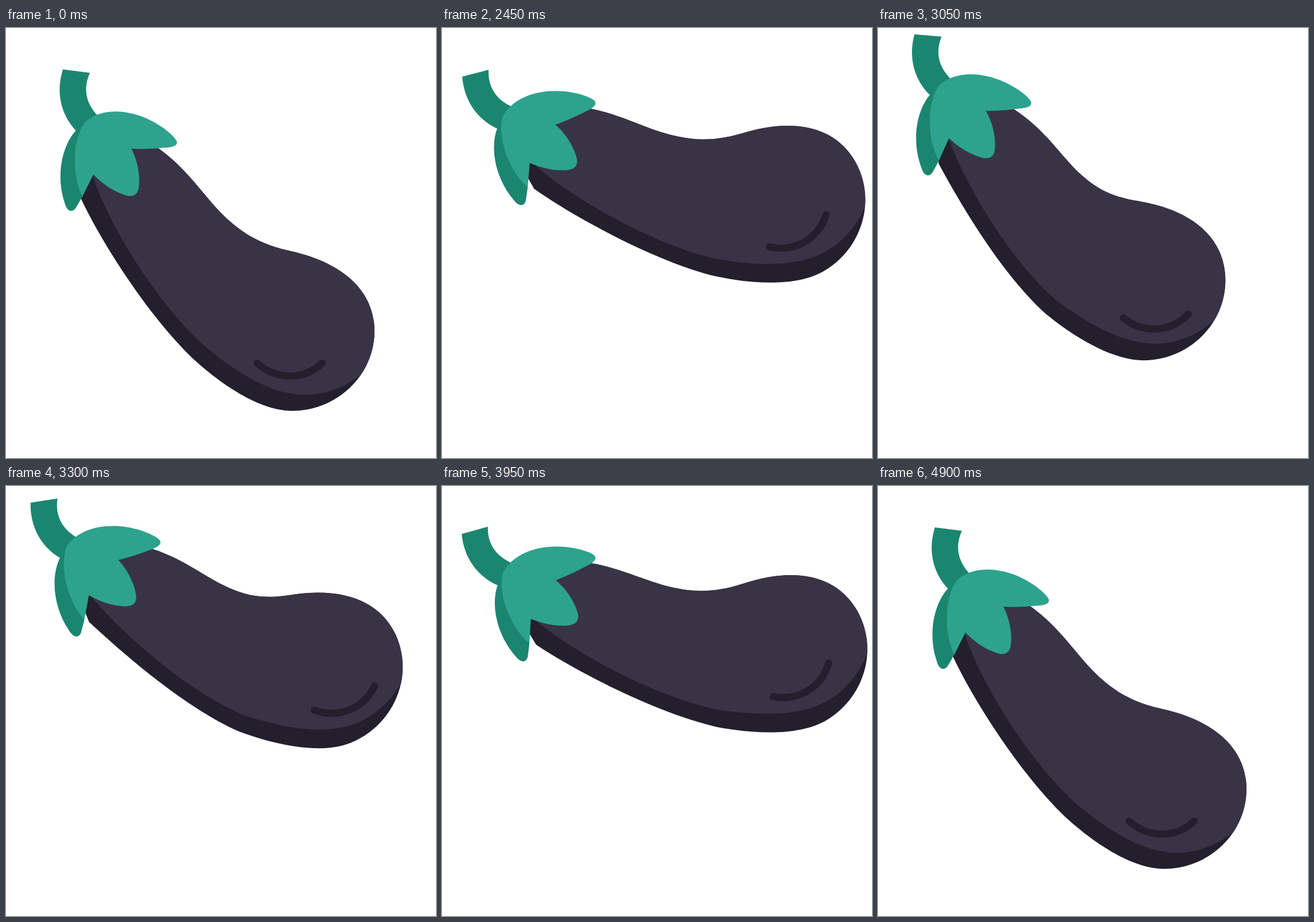
Write an HTML page that moves like this. It is 748 px wide and 748 px high and loops after 4.92 s.

```html
<!DOCTYPE html>
<html lang="en">
<head>
<meta charset="utf-8">
<title>Swinging eggplant</title>
<style>
  html, body { margin: 0; width: 100%; height: 100%; overflow: hidden; background: #fff; }
  svg { display: block; width: 100%; height: 100%; }
</style>
</head>
<body>
<svg viewBox="0 0 748 748">
  <g id="stem">
    <path fill="#1b866f" d="M99 72L146 78C134 104 138 130 160 153L150 178L122 179C94 149 87 110 99 72Z"/>
  </g>
  <g id="body">
    <path id="shade" fill="#231f2c"/>
    <path id="skin" fill="#393445"/>
    <path id="crease" fill="none" stroke="#231f2c" stroke-width="12.5" stroke-linecap="round"
      d="M437 583C470 613 518 613 550 583"/>
  </g>
  <g id="calyx">
    <path fill="#1b866f" d="M140 162L122 178C96 206 87 260 102 304C106 320 116 322 122 312Q128 302 133 293L150 220Z"/>
    <path fill="#2da38d" d="M138 163C160 143 195 143 215 148C248 154 285 178 296 195C300 202 295 207 280 208
      C258 210 238 211 218 210C228 228 234 256 231 277C229 292 219 294 208 291C186 284 168 271 152 255
      L133 293C115 260 114 195 138 163Z"/>
  </g>
</svg>
<script>
const LOOP = 4920;
const PIVOT = { x: 152, y: 255 };

// Turning points of the swing: time in ms and body angle in degrees.
const SWING = [
  [2000, 0], [2430, -30], [2865, 33.5], [3210, -31.8], [3575, 35.6],
  [3980, -32], [4285, 12.7], [4640, -5], [4900, 0]
];

const EDGE = 'M160,180L250,199C322,245 345,300 395,341C425,366 455,379 495,388' +
  'C590,409 641,460 641,527C641,555 632.4,581 617.9,602.6';
const SHADE = EDGE + 'C592,641 547.3,666 498,666C440,666 372,618 325,575C250,503 170,380 131,298L131,240Z';
const SKIN = EDGE + 'C590,625 555,638 520,638C455,638 390,590 345,553C262,478 178,342 150,255Z';

const el = id => document.getElementById(id);
const progress = (t, from, to) => Math.min(1, Math.max(0, (t - from) / (to - from)));
const ease = (t, from, to) => (1 - Math.cos(Math.PI * progress(t, from, to))) / 2;
const pulse = (t, from, to) => Math.sin(Math.PI * progress(t, from, to));

function swingAngle(t) {
  return SWING.slice(1).reduce((angle, [time, target], i) =>
    angle + (target - SWING[i][1]) * ease(t, SWING[i][0], time), 0);
}

function poseAt(t) {
  const angle = swingAngle(t);
  const drift = ease(t, 2000, 2430) - ease(t, 3900, 4640);
  const fall = 84 * ease(t, 3620, 4285) - 21 * ease(t, 4285, 4640);
  const squash = -24 * pulse(t, 2430, 3980) - 33 * pulse(t, 3980, 4640);
  return {
    x: PIVOT.x - 32 * drift - 1.1 * angle,
    y: PIVOT.y - 63 * ease(t, 2200, 2900) + fall + 0.08 * angle,
    angle,
    headAngle: angle * (0.7 - 0.0013 * angle),
    slide: -0.18 * angle,
    dx: squash,
    dy: 0.3 * squash - 0.2 * angle
  };
}

// The shift grows from nothing at the head to its full size at the tail.
function bend(path, dx, dy) {
  return path.replace(/([\d.]+),([\d.]+)/g, (_, px, py) => {
    const reach = (px - PIVOT.x) * 0.55 + (py - PIVOT.y) * 0.83;
    const w = ease(reach, 90, 340);
    return `${(+px + dx * w).toFixed(2)},${(+py + dy * w).toFixed(2)}`;
  });
}

const place = (x, y, angle) =>
  `translate(${x} ${y}) rotate(${angle}) translate(${-PIVOT.x} ${-PIVOT.y})`;

function draw(t) {
  const { x, y, angle, headAngle, slide, dx, dy } = poseAt(t);
  for (const id of ['stem', 'calyx']) el(id).setAttribute('transform', place(x, y, headAngle));
  el('body').setAttribute('transform', `${place(x, y, angle)} translate(${slide} 0)`);
  el('crease').setAttribute('transform', `translate(0 ${slide})`);
  el('shade').setAttribute('d', bend(SHADE, dx, dy));
  el('skin').setAttribute('d', bend(SKIN, dx, dy));
}

const start = performance.now();
function tick() {
  draw((performance.now() - start) % LOOP);
  requestAnimationFrame(tick);
}
tick();
</script>
</body>
</html>
```
